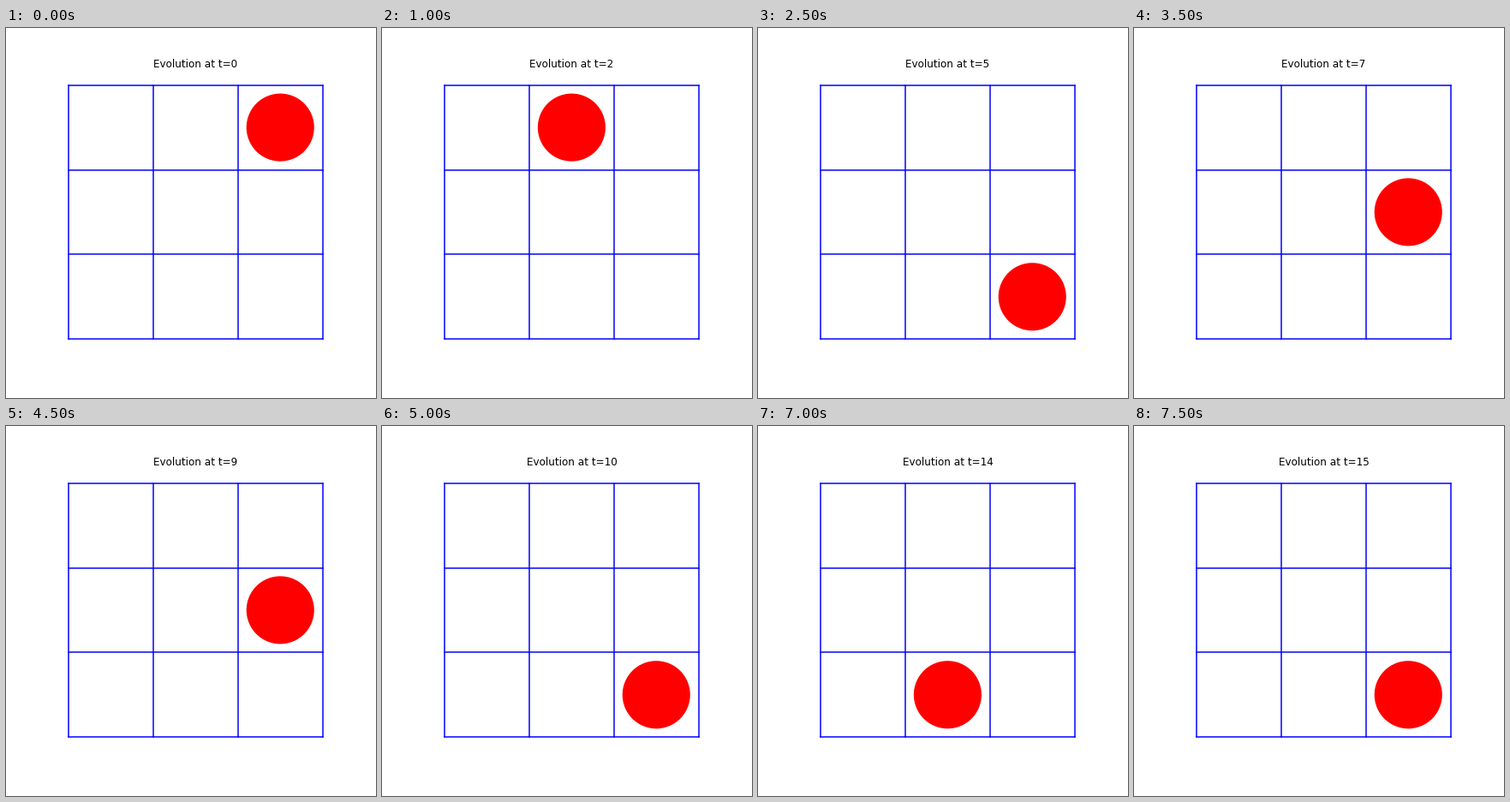
Write a matplotlib script that moves like this. It is 432 px wide and 432 px high and loops after 8 s.

```python
import matplotlib.pyplot as plt
from matplotlib.animation import FuncAnimation
from matplotlib.patches import Circle

SIZE = 3
MARGIN = 0.05 * SIZE
STEP_MS = 500

START = (2, 2)  # column, row counted from the bottom
WALK = "-LDDRU-DUD-ULDR"  # one move per step, "-" stays put

plt.rcParams["font.family"] = "DejaVu Sans"

fig = plt.figure(figsize=(6, 6), dpi=72, facecolor="white")
fig.subplots_adjust(left=0.125, right=0.9, bottom=0.125, top=0.88)
ax = fig.add_subplot()

for k in range(SIZE + 1):
    ax.plot([0, SIZE], [k, k], color="blue", lw=1.5)
    ax.plot([k, k], [0, SIZE], color="blue", lw=1.5)
ax.set(xlim=(-MARGIN, SIZE + MARGIN), ylim=(-MARGIN, SIZE + MARGIN),
       aspect="equal")
ax.axis("off")

walker = ax.add_patch(Circle(START, 0.4, facecolor="red", linewidth=0))
title = ax.set_title("", fontsize=12, pad=6)


def cell(t):
    """Cell reached after the first t moves of the walk."""
    done = WALK[:t]
    return (START[0] + done.count("R") - done.count("L"),
            START[1] + done.count("U") - done.count("D"))


def update(t):
    col, row = cell(t)
    walker.center = (col + 0.5, row + 0.5)
    title.set_text(f"Evolution at t={t}")
    return walker, title


anim = FuncAnimation(fig, update, frames=len(WALK) + 1, interval=STEP_MS,
                     repeat=True, repeat_delay=0, blit=False)
plt.show()
```
